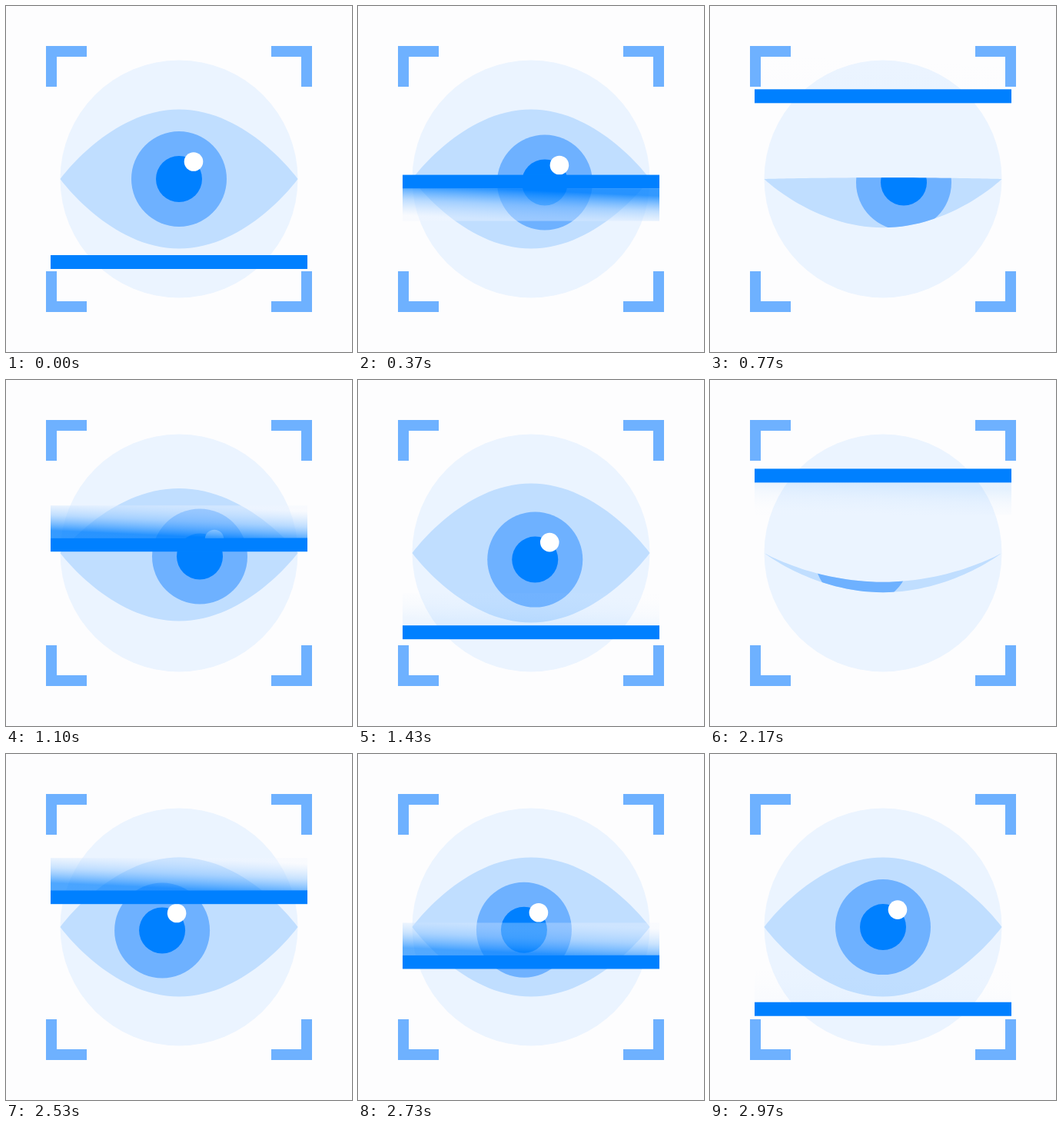
An HTML page that plays this animation: 450x450 px, repeating every 3.01 s.

```html
<!DOCTYPE html>
<html lang="en">
<head>
<meta charset="utf-8">
<title>Eye scan</title>
<style>
  html, body { margin: 0; width: 100%; height: 100%; overflow: hidden; background: #fdfdfe; }
  svg { display: block; width: 100vw; height: 100vh; }
</style>
</head>
<body>
<svg viewBox="0 0 450 450">
  <defs>
    <clipPath id="lids"><path id="lidClip"/></clipPath>
    <linearGradient id="fade" gradientUnits="userSpaceOnUse" x1="0" y1="11" x2="-1.8" y2="51">
      <stop offset="0" stop-color="#0080ff" stop-opacity=".8"/>
      <stop offset=".5" stop-color="#8cc4ff" stop-opacity=".55"/>
      <stop offset="1" stop-color="#f0f5ff" stop-opacity=".35"/>
    </linearGradient>
  </defs>
  <circle cx="225" cy="225" r="154.5" fill="#ebf4ff"/>
  <path id="white" fill="#c0deff"/>
  <g clip-path="url(#lids)">
    <g id="iris">
      <circle r="62" fill="#6eb1ff"/>
      <circle r="30" fill="#0080ff"/>
      <circle cx="19" cy="-22.5" r="12.3" fill="#fff"/>
    </g>
  </g>
  <path d="M59 105V59H105M345 59H391V105M391 345V391H345M105 391H59V345"
        fill="none" stroke="#6eb1ff" stroke-width="14"/>
  <g id="scan">
    <rect id="trail" x="-167" y="9" width="334" height="42" fill="url(#fade)"/>
    <rect x="-167" y="-9" width="334" height="18" fill="#0080ff"/>
  </g>
</svg>
<script>
  const $ = id => document.getElementById(id);
  const LOOP = 3010, STEP = 100 / 3, STEPS = 90, SWEEP = STEPS / 4;

  const mix = (a, b, p) => a + (b - a) * p;

  // smooth 0 to 1 while k runs from a to b
  function ramp(k, a, b) {
    const p = Math.min(1, Math.max(0, (k - a) / (b - a)));
    return p * p * (3 - 2 * p);
  }

  function eyePath(shut) {
    const top = mix(134.5, 273, shut), low = mix(315.5, 273, shut);
    return `M70.5 225C70.5 225 136 ${top} 225 ${top}S379.5 225 379.5 225` +
           `C379.5 225 314 ${low} 225 ${low}S70.5 225 70.5 225Z`;
  }

  function drawEye(k) {
    const half = Math.min(k, STEPS - k); // height and blink mirror in time
    const x = 225 + 27 * (ramp(k, 0, 18) - 2 * ramp(k, 33, 56) + ramp(k, 71, 89));
    const y = 225 + 4.5 * (ramp(half, 0, 11) + ramp(half, 34, 45));
    const d = eyePath(ramp(half, 18, 26.4) - ramp(half, 26.4, 34));
    $('white').setAttribute('d', d);
    $('lidClip').setAttribute('d', d);
    $('iris').setAttribute('transform', `translate(${x} ${y})`);
  }

  function drawScan(k) {
    const down = Math.floor(k / SWEEP) % 2;
    const p = k % SWEEP / SWEEP;
    const rise = down ? 1 - p : p;
    $('scan').setAttribute('transform', `translate(225 ${mix(333, 117, ramp(rise, 0, 1))})`);
    $('trail').setAttribute('transform', `rotate(${180 * down})`);
    $('trail').setAttribute('opacity', Math.sin(Math.PI * p) ** 2);
  }

  const start = performance.now();
  function tick() {
    const time = (performance.now() - start) % LOOP;
    const k = Math.min(STEPS - 1, Math.floor((time + 3.4) / STEP));
    drawEye(k);
    drawScan(k);
    requestAnimationFrame(tick);
  }
  tick();
</script>
</body>
</html>
```
